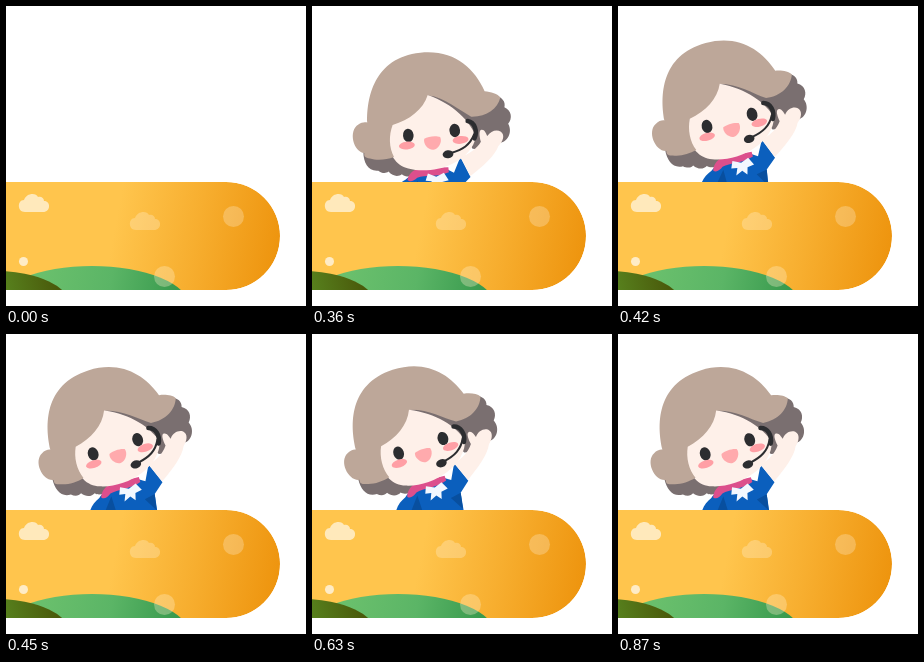
These frames come from a looping animation (300 by 300 pixels, 0.9 s). An HTML page with a canvas:

```html
<!DOCTYPE html>
<html>
<head>
<meta charset="utf-8">
<style>
html, body { margin: 0; width: 100%; height: 100%; overflow: hidden; background: #fff; }
canvas { display: block; width: 300px; height: 300px; }
</style>
</head>
<body>
<canvas id="stage" width="300" height="300"></canvas>
<script>
const ctx = document.getElementById('stage').getContext('2d');
const LOOP = 900, STEP = 30, ENTER = 330;
const TILT = 17.6 * Math.PI / 180, RISE = 27.5;
const PIVOT = { x: 124.5, y: 189 };
const LIGHT = '#bda799', DARK = '#7a6f70', SKIN = '#fef0e9', INK = '#2c2d30';

// time, distance still to go (1 = upright and low, 0 = at rest)
const KEYS = [[330, 1], [360, .66], [390, .375], [420, .14], [450, 0],
              [540, -.035], [630, -.042], [720, -.005], [900, .005]];

function fill(path, color) {
  ctx.fillStyle = color;
  ctx.fill(new Path2D(path));
}

function line(path, color, width) {
  ctx.strokeStyle = color;
  ctx.lineWidth = width;
  ctx.lineCap = 'round';
  ctx.stroke(new Path2D(path));
}

function oval(x, y, rx, ry, color) {
  ctx.fillStyle = color;
  ctx.beginPath();
  ctx.ellipse(x, y, rx, ry, 0, 0, 7);
  ctx.fill();
}

function gradient(x0, y0, x1, y1, ...colors) {
  const g = ctx.createLinearGradient(x0, y0, x1, y1);
  colors.forEach((c, i) => g.addColorStop(i / (colors.length - 1), c));
  return g;
}

function remaining(t) {
  let i = 1;
  while (i < KEYS.length - 1 && KEYS[i][0] < t) i++;
  const [t0, a] = KEYS[i - 1], [t1, b] = KEYS[i];
  return a + (b - a) * (t - t0) / (t1 - t0);
}

function cloud(x, y, alpha) {
  ctx.save();
  ctx.translate(x, y);
  fill('M6 18 C-2 18 -2 6 5 6 C7 -1 17 -2 19 3 C22 2 25 4 25 7 C32 7 32 18 24 18 Z',
       `rgba(255,255,255,${alpha})`);
  ctx.restore();
}

function banner() {
  ctx.save();
  const pill = new Path2D('M0 176 H220 A54 54 0 0 1 220 284 H0 Z');
  ctx.clip(pill);
  ctx.fillStyle = gradient(110, 215, 270, 246, '#ffc54d', '#f7ae2f', '#ee950f');
  ctx.fill(pill);
  cloud(13, 188, .62);
  cloud(124, 206, .24);
  oval(227.5, 210.5, 10.5, 10.5, 'rgba(255,255,255,.24)');
  oval(86, 300, 97, 40, gradient(40, 262, 170, 284, '#69bf6c', '#5bb566', '#399a4e'));
  oval(-10, 301, 75, 36, gradient(0, 284, 50, 274, '#57801d', '#4a5a0b'));
  oval(158.5, 270.5, 10.5, 10.5, 'rgba(255,240,205,.32)');
  oval(17.5, 255.5, 4.5, 4.5, 'rgba(255,255,255,.68)');
  ctx.restore();
}

function hairBack() {
  fill('M55 150 C54 161 58 170 68 170 C71 173 75 174 78 172 C82 178 88 178 91 176 C95 181 108 180 114 174 L112 140 L62 140 Z', DARK);
  fill('M124 100 L160 104 L190 107 C199 109 202 115 200 120 C207 124 207 132 202 137 C206 146 199 156 191 155 C184 160 172 160 164 158 L150 130 Z', DARK);
}

function body() {
  fill('M81 192 C84 187 89 184 94 182 C103 175 112 175 137 176 L143 180 L151 165 L159 186 L148 195 L145 214 L78 214 Z', '#0b5fbd');
  fill('M106 184 L106 200 L96 196 Z M148 195 L145 211 L137 197 Z', '#084f9f');
  fill('M96 182 C98 176 104 172 110 172 L138 174 L138 179 C126 183 114 179 106 181 C102 184 98 185 96 182 Z', '#dc4f8c');
  fill('M125 182 L117 178 L114 185 L120 186 L117 193 L124 190 L128 195 L130 188 L137 187 L133 179 Z', '#f3f8ff');
}

function face() {
  fill('M125 99 C104 104 88 117 82 138 C79 154 86 167 98 171 C111 176 128 176 142 171 C154 167 166 158 169 145 C172 131 160 108 125 99 Z', SKIN);
  oval(101.5, 138, 5.3, 6.7, INK);
  oval(148.2, 138, 5.3, 6.7, INK);
  oval(99, 148, 8, 3.9, '#ff9fa5');
  oval(153, 148, 8, 3.9, '#ff9fa5');
  fill('M117 143 C121 141 129 141 133 143 C135 148 130 155 125 155 C120 155 115 148 117 143 Z', '#ffaaad');
}

function hairFront() {
  fill('M125 100 C138 102 154 111 166 124 C173 130 172 141 169 147 C164 130 150 112 125 100 Z', DARK);
  fill('M62 121 C64 97 75 57 122 57 C155 57 174 77 182 102 C188 103 195 106 197 110 C193 121 181 128 166 126 C154 118 143 105 125 100 C119 114 104 123 87 126 C82 136 81 148 85 158 C77 160 68 160 61 157 C56 156 55 154 56 151 C45 149 42 127 53 122 C56 120 60 120 62 121 Z', LIGHT);
}

function headset() {
  line('M162 130 C169 132 171 141 167 148', INK, 4.5);
  line('M167 144 C162 154 154 158 142 160', INK, 2);
  oval(139, 161, 5.4, 4, INK);
}

function arm() {
  fill('M151 165 C160 163 168 159 173 152 C172 146 172 140 175 140 C178 140 179 144 180 147 C184 142 190 141 194 144 C198 148 195 154 190 158 C186 167 172 177 159 185 Z', SKIN);
}

function girl(t) {
  const q = remaining(t);
  const low = q > 0 ? q ** 1.28 : q;
  ctx.save();
  ctx.beginPath();
  ctx.rect(0, 0, 300, 176);
  ctx.clip();
  ctx.translate(PIVOT.x, PIVOT.y - RISE * (1 - low));
  ctx.rotate(-TILT * (1 - q));
  ctx.translate(-PIVOT.x, -PIVOT.y);
  [hairBack, body, face, hairFront, headset, arm].forEach(part => part());
  ctx.restore();
}

function draw(now) {
  const t = Math.floor(now % LOOP / STEP) * STEP;
  ctx.fillStyle = '#fff';
  ctx.fillRect(0, 0, 300, 300);
  if (t >= ENTER) girl(t);
  banner();
}

const start = performance.now();
function tick() {
  draw(performance.now() - start);
  requestAnimationFrame(tick);
}
tick();
</script>
</body>
</html>
```
